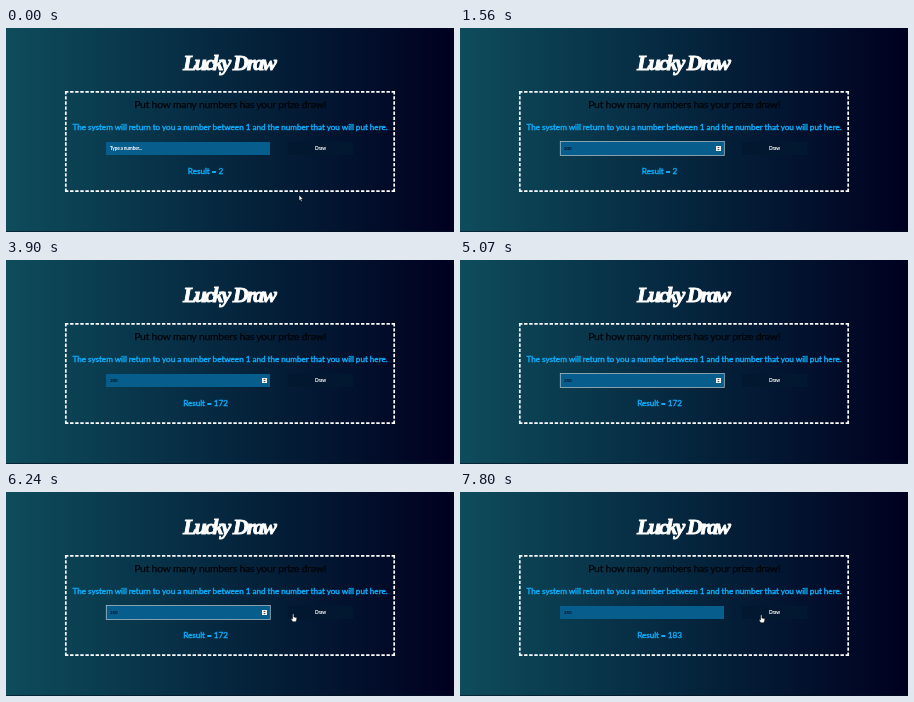
These frames come from a looping animation (448 px wide and 204 px high, 8 s). An HTML page:

```html
<!DOCTYPE html>
<html lang="en">
<head>
<meta charset="utf-8">
<title>Lucky Draw</title>
<style>
  html, body { margin: 0; width: 100%; height: 100%; overflow: hidden; background: #000020; }
  svg { display: block; width: 100vw; height: 100vh; }
  text { font-family: Lato, sans-serif; }
  .title { font: italic bold 22px "Liberation Serif", serif; letter-spacing: -2px; fill: #fff; stroke: #fff; stroke-width: .9; }
  .head { font-size: 10.4px; letter-spacing: -.23px; fill: #000408; stroke: #000408; stroke-width: .25; }
  .info { font-size: 8.2px; letter-spacing: -.05px; fill: #0cacfa; stroke: #0cacfa; stroke-width: .4; }
  .small { font-size: 4.8px; font-weight: bold; letter-spacing: -.18px; fill: #fff; }
  .typed { font-size: 4.5px; font-weight: bold; letter-spacing: -.1px; fill: #000c18; }
  .mid { text-anchor: middle; }
  .dashes { fill: none; stroke: #fff; stroke-width: 1.7; }
  .cursor { fill: #fff; stroke: #000; stroke-width: .5; stroke-linejoin: round; }
</style>
</head>
<body>
<svg viewBox="0 0 448 204" preserveAspectRatio="none">
  <defs>
    <linearGradient id="night">
      <stop offset="0" stop-color="#0e4c5c"/>
      <stop offset=".5" stop-color="#05263e"/>
      <stop offset="1" stop-color="#00001f"/>
    </linearGradient>
  </defs>
  <rect width="448" height="204" fill="url(#night)"/>
  <rect y="203" width="448" height="1" fill="#00101f" opacity=".6"/>
  <text class="title mid" x="223" y="42">Lucky Draw</text>
  <path class="dashes" d="M59 63.8H389M59 163.2H389" stroke-dasharray="3.4 1.703"/>
  <path class="dashes" d="M59.8 63V164M388.2 63V164" stroke-dasharray="3.4 1.737"/>
  <text class="head mid" x="224.2" y="80">Put how many numbers has your prize draw!</text>
  <text class="info mid" x="224" y="102">The system will return to you a number between 1 and the number that you will put here.</text>

  <rect x="100" y="114" width="164" height="13" fill="#075d8c"/>
  <rect id="ring" x="100.3" y="113.5" width="164" height="14" fill="none" stroke="#a4bcc8" stroke-width=".8"/>
  <text id="entry" x="104" y="122"></text>
  <g id="spinner">
    <rect x="256" y="118" width="5" height="5" fill="#f2f2f2"/>
    <path d="M257.2 120l1.3-1.2 1.3 1.2zM257.2 121l1.3 1.2 1.3-1.2z" fill="#444"/>
  </g>

  <rect x="282" y="114" width="65" height="13" fill="#021830"/>
  <text class="small mid" x="314.5" y="122">Draw</text>
  <text id="result" class="info mid" x="199.5" y="145.5"></text>

  <path id="arrow" class="cursor" d="M0 0V5.6L1.3 4.5 2.2 6.5 3.2 6 2.3 4.1H4z"/>
  <path id="hand" class="cursor" d="M-1.4-3.8q.7-.7 1.3 0V-1L2.4-.4Q3-.1 2.8 1L2 3.8H-1.3L-3 .9q.2-1 1.6 0z"/>
</svg>
<script>
const LOOP = 8000;
const $ = id => document.getElementById(id);

// Each track lists [start in ms, value...]; a value holds until the next start.
const pointer = [
  [0, 'arrow', 293, 167], [130, 'arrow', 272, 151], [260, 'arrow', 240, 134], [390, 'beam'],
  [2210, 'arrow', 268, 121], [2340, 'hand', 290, 121], [2470, 'hand', 308, 121],
  [3900, 'beam'], [5590, 'hand', 258, 121], [6110, 'arrow', 270, 123],
  [6240, 'hand', 288, 126], [6370, 'hand', 302, 127]
];
const entry = [
  [0, ''], [1300, '2'], [1430, '20'], [1560, '200'],
  [4810, '2'], [4940, '25'], [5070, '250']
];
const result = [[0, 2], [2730, 64], [3250, 118], [3640, 172], [6760, 87], [6890, 124], [7410, 31], [7800, 183]];
const focus = [[0, false], [650, true], [2730, false], [4290, true], [6760, false]];

const at = (track, t) => track.findLast(step => step[0] <= t).slice(1);
const show = (id, on) => $(id).setAttribute('visibility', on ? 'visible' : 'hidden');

function draw(now) {
  const t = now % LOOP;
  const [kind, x, y] = at(pointer, t);
  const [value] = at(entry, t);
  const [focused] = at(focus, t);

  $('entry').textContent = value || 'Type a number...';
  $('entry').setAttribute('class', value ? 'typed' : 'small');
  $('result').textContent = 'Result = ' + at(result, t)[0];
  show('ring', focused);
  show('spinner', focused || kind === 'beam');

  for (const id of ['arrow', 'hand']) {
    show(id, id === kind);
    if (id === kind) $(id).setAttribute('transform', `translate(${x} ${y})`);
  }
  requestAnimationFrame(() => draw(performance.now()));
}
draw(0);
</script>
</body>
</html>
```
